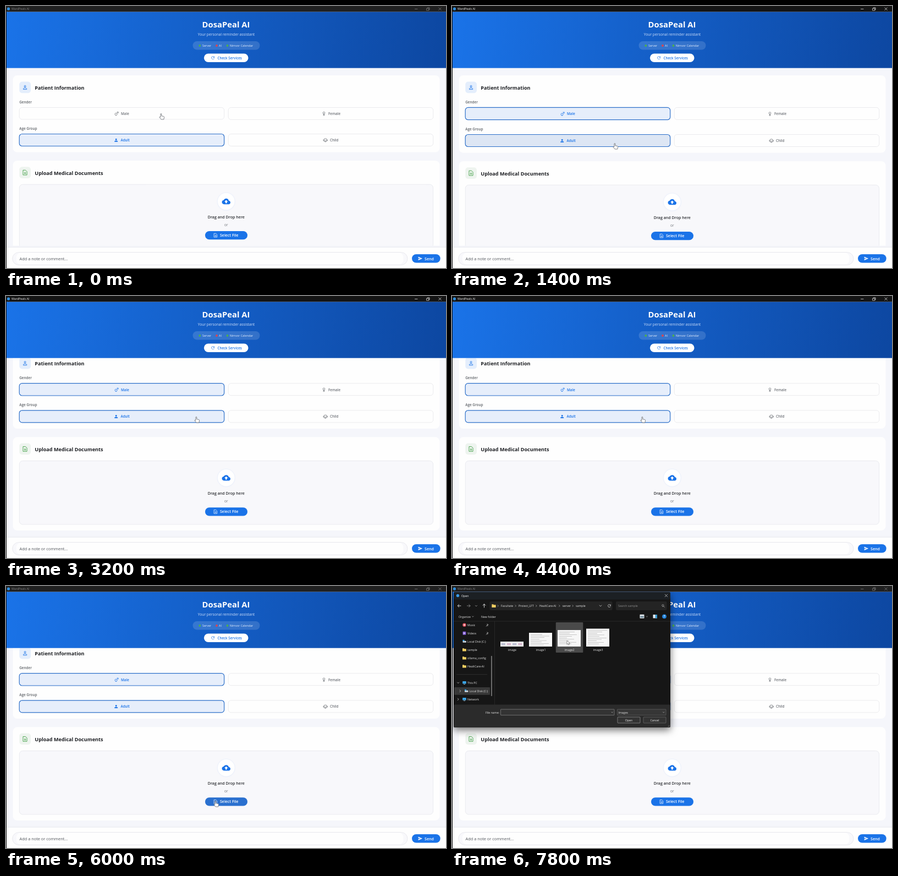
Write an HTML page that moves like this. It is 800x476 px and loops after 8000 ms.

```html
<!DOCTYPE html>
<html lang="en">
<head>
<meta charset="utf-8">
<title>Patient form</title>
<style>
html, body { margin: 0; width: 100%; height: 100%; overflow: hidden; background: #0b0b0b; }
svg { display: block; width: 100%; height: 100%; }
text { font-family: "Open Sans", "Noto Sans", sans-serif; white-space: pre; }
</style>
</head>
<body>
<svg id="stage" viewBox="0 0 800 476"></svg>
<script>
const BLUE = '#1a73e8', GREY = '#6c7076', INK = '#1c1e22';
const STEP = 200, LOOP = 8000, SCROLL = 25.7;

// Markup helpers
const rect = (x, y, w, h, fill, r = 0, extra = '') =>
  `<rect x="${x}" y="${y}" width="${w}" height="${h}" rx="${r}" fill="${fill}" ${extra}/>`;
const dot = (x, y, r, fill, extra = '') => `<circle cx="${x}" cy="${y}" r="${r}" fill="${fill}" ${extra}/>`;
const text = (s, x, y, size, fill, weight = 400, anchor = 'start', extra = '') =>
  `<text x="${x}" y="${y}" font-size="${size}" fill="${fill}" font-weight="${weight}" text-anchor="${anchor}" ${extra}>${s}</text>`;
const line = (d, stroke, w = 0.7, extra = '') =>
  `<path d="${d}" fill="none" stroke="${stroke}" stroke-width="${w}" stroke-linecap="round" stroke-linejoin="round" ${extra}/>`;
const group = (inner, attrs = '') => `<g ${attrs}>${inner}</g>`;
const edge = (color, w = 0.7) => `stroke="${color}" stroke-width="${w}"`;

// Icons live on a 24-unit grid, centred on (x, y)
const FILLED = {
  person: 'M12 12a4 4 0 1 0 0-8 4 4 0 0 0 0 8zm0 2c-2.7 0-8 1.3-8 4v2h16v-2c0-2.7-5.3-4-8-4z',
  send: 'M2 21L23 12 2 3v7l15 2-15 2z',
  cloud: 'M19.4 10C18.7 6.6 15.6 4 12 4 9.1 4 6.6 5.6 5.4 8 2.3 8.4 0 10.9 0 14c0 3.3 2.7 6 6 6h13c2.8 0 5-2.2 5-5 0-2.6-2-4.8-4.6-5zM14 13v4h-4v-4H7l5-5 5 5z',
  refresh: 'M17.6 6.4A8 8 0 1 0 19.7 14h-2A6 6 0 1 1 16.2 7.8L13 11h7V4z',
  folder: 'M1 4h8l3 3h11v14H1z'
};
const LINED = {
  user: 'M12 11a3.4 3.4 0 1 0 0-6.8 3.4 3.4 0 0 0 0 6.8zM5 19.5v-2c0-4 14-4 14 0v2z',
  male: 'M9.5 20a5.5 5.5 0 1 0 0-11 5.5 5.5 0 0 0 0 11zM13.5 10.5L20 4M14.5 4H20v5.5',
  female: 'M12 13.5a5 5 0 1 0 0-10 5 5 0 0 0 0 10zM12 13.5V22M8.5 18h7',
  child: 'M12 20a8 8 0 1 0 0-16 8 8 0 0 0 0 16zM4 10c-4 0-4 5 0 5M20 10c4 0 4 5 0 5M8.5 14.5c1.5 3 5.500 3 7 0M9 10.500v.5M15 10.500v.5',
  doc: 'M5 2.500h9l5.500 5.500v13.500H5zM12 10v7M9 14l3 3 3-3',
  search: 'M10 16a6 6 0 1 0 0-12 6 6 0 0 0 0 12zM14.500 14.500L21 21'
};
const icon = (name, x, y, size, color, w = 2) => {
  const place = `transform="translate(${x - size / 2} ${y - size / 2}) scale(${size / 24})"`;
  return FILLED[name] ? `<path d="${FILLED[name]}" fill="${color}" fill-rule="evenodd" ${place}/>`
    : line(LINED[name], color, w, place);
};

const option = (id, x, y, glyph, label, gx, tx, on) =>
  rect(x, y, 372.500, 22, on ? '#e6eefb' : '#fefefe', 5, `id="${id}" ` + (on ? edge('#2c6fc9', 1.2) : edge('#e2e3e7'))) +
  group(icon(glyph, gx, y + 11.2, 9, 'currentColor') + text(label, tx, y + 13.500, 6.3, 'currentColor', 600),
    `id="${id}Label" color="${on ? BLUE : GREY}"`);

const titleBar = () =>
  rect(0, 0, 800, 10.700, '#151515', 0, 'id="bar"') + dot(4.500, 5.200, 2.600, '#2f8fdd') +
  group(text('WardPeals AI', 10, 7.400, 5.300, 'currentColor') +
    line('M743.500 5.500h4.500M765 4.200h3.800v3.800h-3.800zM766.200 4.200v-1.200h3.800v3.800h-1.200M786.700 3l4.600 4.600M791.300 3l-4.600 4.600', 'currentColor', 0.700),
    'id="barInk"');

const header = () =>
  rect(1, 10.700, 799, 102, 'url(#sky)') +
  text('DosaPeal AI', 400, 38.600, 14.800, '#fff', 700, 'middle') +
  text('Your personal reminder assistant', 400.500, 53.800, 6.700, '#cfe0fa', 400, 'middle') +
  rect(339.500, 64, 122, 15.500, '#fff', 7.700, 'opacity=".14"') +
  dot(352.300, 72, 1.900, '#4caf50') + text('Server', 357, 74, 5.400, '#e3edfc') +
  dot(383, 72, 1.900, '#e5434a') + text('AI', 387, 74, 5.400, '#e3edfc') +
  dot(402.500, 72, 1.900, '#4caf50') + text('Nimvor Calendar', 406.700, 74, 5.400, '#e3edfc') +
  rect(360, 86.500, 80.500, 15.500, '#fff', 7.700) + icon('refresh', 376.200, 94.200, 8.500, BLUE) +
  text('Check Services', 384.500, 96.600, 6.250, BLUE, 600);

const patientCard = () =>
  rect(12.500, 126, 776, 140, '#fefefe', 8, 'id="card"') +
  rect(24.300, 137.500, 20.700, 20.700, '#e4eefc', 5) + icon('user', 34.600, 147.800, 10.500, BLUE) +
  text('Patient Information', 52.300, 151.700, 9.050, INK, 700) +
  text('Gender', 24.200, 176.800, 6.400, '#5f6368', 600) +
  option('male', 24.200, 184.400, 'male', 'Male', 201, 209, false) +
  option('female', 404.200, 184.400, 'female', 'Female', 578, 586, false);

const ageRow = () =>
  text('Age Group', 24.200, 224.700, 6.400, '#5f6368', 600) +
  option('adult', 24.200, 232.500, 'person', 'Adult', 200.200, 208.500, true) +
  option('kid', 404.200, 232.500, 'child', 'Child', 580.700, 589, false);

const uploadCard = () =>
  rect(12.500, 281, 776, 145 + SCROLL - 1, '#fefefe', 8) +
  rect(24.300, 292.300, 20.700, 20.700, '#eef4ef', 5) + icon('doc', 34.600, 302.600, 11, '#43a047') +
  text('Upload Medical Documents', 52.300, 306.500, 9.100, INK, 700) +
  rect(24.300, 324.200, 752.200, 115.500, '#f8f8fb', 6, edge('#e3e4ea')) +
  dot(400.300, 355.200, 17, '#1a73e8', 'opacity=".035"') + dot(400.300, 355, 15.200, '#fff') +
  icon('cloud', 400.300, 355, 15.500, BLUE) +
  text('Drag and Drop here', 400.300, 386, 7.100, '#2b2d31', 600, 'middle') +
  text('or', 400.300, 399.700, 6.400, GREY, 400, 'middle') +
  rect(362, 409, 77, 15.300, BLUE, 7.600, 'id="pick"') + icon('doc', 381, 416.600, 8.500, '#fff') +
  text('Select File', 389, 419.200, 7, '#fff', 600);

const footer = () =>
  rect(1, 435.500, 799, 4, 'url(#lift)') + rect(1, 439, 799, 37, '#fefefe') +
  rect(11.700, 447.500, 718.300, 23, '#f8f8fb', 11.500, edge('#e2e3e8')) +
  rect(19, 448.300, 703.500, 21.400, '#fefefe', 8) +
  text('Add a note or comment...', 24.500, 462.400, 7.400, '#50545a') +
  rect(738, 451, 51.700, 15.500, BLUE, 7.700) + icon('send', 753.200, 458.800, 8.500, '#fff') +
  text('Send', 761, 461.500, 7.100, '#fff', 600);

// Dialog parts
const label = (s, x, y, color = '#e4e4e4', anchor) => text(s, x, y, 5.250, color, 400, anchor);
const sideRow = ([name, y, kind]) => {
  const deep = y > 170, x = deep && y === 190.800 ? 31.500 : 28;
  const ix = x - 5.500;
  const art = kind === 'folder' ? icon('folder', ix, y, 7.500, '#f3cf62')
    : kind === 'disk' ? rect(ix - 3, y - 1, 6.500, 3, '#c8d2da', 0.700) + rect(ix - 3, y - 3, 3, 2.200, '#35a3e8')
    : kind === 'music' ? dot(ix, y, 3.200, '#e05563') + dot(ix, y, 1.200, '#fff')
    : kind === 'video' ? rect(ix - 3, y - 3, 6, 6, '#8058d8', 1) + line(`M${ix - 0.700} ${y - 1.300}l2 1.300-2 1.300z`, '#fff')
    : rect(ix - 3.300, y - 2.800, 6.600, 4.600, '#3aa4e6', 0.600) + rect(ix - 1.500, y + 2.300, 3, 0.800, '#b9c7d2');
  return art + label(name, x, y + 1.900) + (kind === 'music' || kind === 'video' ?
    line(`M64 ${y - 2}l2 2M63.300 ${y}l1.700 1.700M65 ${y - 1.200}l-1 2.500M64 ${y + 0.800}l-1.700 1.700`, '#aaa', 0.900) : '');
};
const thumb = (name, i, top) => {
  const x = 88 + 52 * i;
  let art = rect(x, top, 42, 110 - top, '#f7f7f7');
  if (!i) {
    for (let k = 0; k < 4; k++) art += rect(x + 1.500 + k * 10.200, top + 3, 7.500, 3.200, k % 2 ? '#d7b5cc' : '#b9bcd0');
    art += line(`M${x + 1} ${top + 1.500}h40M${x + 1} ${top + 7.500}h40`, '#aaa', 0.500);
  } else {
    for (let k = 0, y = top + 3; y < 107; y += 2.700, k++) {
      art += rect(x + 3, y, 14 + (k * 13 + i * 7) % 22, 0.600, '#a8a8a8');
    }
  }
  return art + label(name, x + 21.500, 118.200, '#e4e4e4', 'middle');
};
const crumbs = [['Facultate', 89], ['Proiect_LFT', 121], ['HealtCare-AI', 158.700], ['server', 200.700], ['sample', 225]];
const side = [['Music', 70.800, 'music'], ['Videos', 85.800, 'video'], ['Local Disk (C:)', 100.800, 'disk'],
  ['sample', 115.800, 'folder'], ['ollama_config', 130.800, 'folder'], ['HealtCare-AI', 145.800, 'folder'],
  ['This PC', 175.800, 'pc'], ['Local Disk (C:)', 190.800, 'disk'], ['Network', 205.800, 'pc']];

const dialog = () =>
  rect(3, 11, 394, 246, '#191919', 3, 'filter="url(#drop)"') +
  rect(3, 11, 394, 13.500, '#1c2024', 3) +
  dot(10.500, 17.500, 2.700, '#3a9be8') + label('Open', 17, 19.500, '#fff') +
  line('M387.200 15.200l4.500 4.500M391.700 15.200l-4.500 4.500', '#ddd') +
  line('M16 36h-5.500M12.700 33.700L10.300 36l2.400 2.300M58.500 39v-6M56 35.300l2.500-2.500 2.500 2.500', '#e8e8e8', 0.900) +
  line('M27.500 36H33M30.800 33.700l2.400 2.300-2.400 2.300M42.300 35.300l1.700 1.700 1.700-1.700', '#999', 0.800) +
  rect(68.500, 28, 223, 16, '#242424', 2) + rect(298, 28, 92.500, 16, '#242424', 2) +
  icon('folder', 76, 36, 8, '#f3cf62') +
  crumbs.map(([s, x]) => line(`M${x - 6} 34.700l1.400 1.400-1.400 1.400`, '#bbb') + label(s, x, 38)).join('') +
  line('M268 35l2 2 2-2', '#ddd') + icon('refresh', 286, 36, 8, '#ddd') +
  label('Search sample', 302, 38, '#8d8d8d') + icon('search', 384, 36, 7, '#ccc') +
  label('Organize', 12, 57.500) + line('M36.800 55l1.200 1.200 1.200-1.200', '#bbb') + label('New folder', 53, 57.500) +
  rect(341.500, 51.700, 8, 7, '#dfe5ea', 0.700) + rect(342.500, 54.500, 6, 3, '#6d8798') +
  line('M353.200 55l1.200 1.200 1.200-1.200', '#bbb') +
  rect(365.500, 52, 7.500, 6.500, '#e5e9ec', 0.500) + rect(369.500, 52, 3.500, 6.500, '#3b9bd3') +
  dot(386, 55.300, 3.900, '#2384dc') + text('?', 386, 57.400, 5.500, '#fff', 700, 'middle') +
  rect(3, 63.700, 394, 0.600, '#353535') + rect(77.300, 64, 0.700, 152, '#303030') +
  rect(4, 184, 65, 13.700, '#383838', 1) + rect(71.300, 127, 1.300, 73, '#9a9a9a', 0.600) +
  rect(8, 160.500, 56, 0.600, '#3d3d3d') +
  line('M9.500 175l1.700 1.700 1.700-1.700M14 189l1.800 1.800-1.800 1.800M10.300 204l1.800 1.800-1.800 1.800', '#ccc', 0.800) +
  side.map(sideRow).join('') +
  rect(188.800, 66, 49.500, 55, '#4a4a4a', 1, 'id="hover"') +
  thumb('image', 0, 101) + thumb('image1', 1, 85) + thumb('image2', 2, 80) + thumb('image3', 3, 77.500) +
  rect(3, 215.500, 394, 41.500, '#2b2b2b', 2) + label('File name:', 86, 231.600, '#e4e4e4', 'end') +
  rect(88.500, 224, 206.500, 10.700, '#333', 0.500, edge('#8b8b8b')) +
  rect(300.500, 224, 88.500, 10.700, '#363636', 0.500, edge('#626262')) + label('Images', 302.500, 231.500) +
  line('M290 229l1.200 1.200 1.200-1.200M383.500 229l1.200 1.200 1.200-1.200', '#bbb') +
  rect(301, 238, 41, 11, '#333', 1, edge('#989898')) + label('Open', 321.500, 245.500, '#f0f0f0', 'middle') +
  rect(348, 238, 41, 11, '#333', 1, edge('#6d6d6d')) + label('Cancel', 368.500, 245.500, '#f0f0f0', 'middle') +
  line('M393 255.500l2.500-2.500M395 255.500l.5-.5', '#888');

const stage = document.getElementById('stage');
stage.innerHTML = `<defs>
  <linearGradient id="sky" gradientUnits="userSpaceOnUse" x1="0" y1="10.700" x2="800" y2="112.700">
    <stop stop-color="#1a73e8"/><stop offset="1" stop-color="#0d47a1"/></linearGradient>
  <linearGradient id="lift" x2="0" y2="1"><stop stop-color="#f5f6fb"/><stop offset="1" stop-color="#ededf3"/></linearGradient>
  <filter id="drop" x="-10%" y="-10%" width="120%" height="125%">
    <feDropShadow dx="0" dy="5" stdDeviation="7" flood-opacity=".55"/></filter>
  <clipPath id="view"><rect x="1" y="112.700" width="799" height="326.300"/></clipPath></defs>` +
  rect(1, 10, 799, 466, '#f5f6fb') +
  group(group(patientCard() + group(ageRow() + uploadCard(), 'id="lower"'), 'id="page"'), 'clip-path="url(#view)"') +
  titleBar() + header() + footer() + group(dialog(), 'id="dialog"') +
  `<path id="hand" d="M-2-5q1-1 1.800 0v3.700l4 .9q1 .4.8 1.600l-.7 3.800h-4.800l-3.200-3.900q0-1.300 2.100-.2z" fill="#fff" stroke="#62666c" stroke-width=".8" stroke-linejoin="round"/>
   <path id="arrow" d="M-2-4v7.200l1.700-1.500 1.300 2.600 1.300-.6-1.300-2.500h2.300z" fill="#fff" stroke="#333" stroke-width=".5"/>`;

const el = id => document.getElementById(id);
const set = (id, attrs) => { for (const k in attrs) el(id).setAttribute(k, attrs[k]); };
const show = (id, on) => set(id, { visibility: on ? 'visible' : 'hidden' });

// Pointer stops: time, x, y
const stops = [[0, 283, 201], [400, 283, 201], [1200, 297, 255], [1600, 297, 255], [2400, 347, 225], [5000, 347, 225],
  [5600, 382, 396], [6000, 382, 396], [6200, 371, 252], [6600, 270, 140], [6800, 270, 140], [7400, 211, 103], [8000, 211, 103]];
const ease = p => p * p * (3 - 2 * p);
function pointer(t) {
  const i = stops.findIndex(s => s[0] > t);
  const [t0, x0, y0] = stops[i - 1], [t1, x1, y1] = stops[i];
  const p = ease((t - t0) / (t1 - t0));
  return [x0 + (x1 - x0) * p, y0 + (y1 - y0) * p];
}

function draw(t) {
  const idle = t < 200 || t >= 5800, chosen = t >= 400, open = t >= 6200;
  const scroll = t < 2600 ? 0 : t < 2800 ? SCROLL / 2 : SCROLL;
  const [x, y] = pointer(t);

  set('bar', { fill: idle ? '#202020' : '#141414' });
  set('barInk', { color: idle ? '#858585' : '#f2f2f2' });
  set('male', {
    fill: chosen ? '#e6eefb' : '#fefefe', height: chosen ? 22.300 : 21.500,
    stroke: chosen ? '#2c6fc9' : '#e2e3e7', 'stroke-width': chosen ? 1.200 : 0.700
  });
  set('maleLabel', { color: chosen ? BLUE : GREY, transform: `translate(0 ${chosen ? 0.400 : 0})` });
  set('femaleLabel', { transform: `translate(0 ${chosen ? 0.400 : 0})` });
  set('card', { height: chosen ? 140.700 : 139.700 });
  set('lower', { transform: `translate(0 ${chosen ? 1 : 0})` });
  set('page', { transform: `translate(0 ${-scroll})` });
  set('adult', { fill: t >= 1000 && t < 2000 ? '#dde6f4' : '#e6eefb' });
  set('pick', { fill: t >= 5600 && !open ? '#2a70cf' : BLUE });

  show('dialog', open);
  show('hover', open && x > 188 && x < 239 && y > 66 && y < 121);
  show('hand', !open);
  show('arrow', open);
  set(open ? 'arrow' : 'hand', { transform: `translate(${x} ${y})` });
}

function tick(now) {
  draw(Math.floor(now % LOOP / STEP) * STEP);
  requestAnimationFrame(tick);
}
draw(0);
requestAnimationFrame(tick);
</script>
</body>
</html>
```
